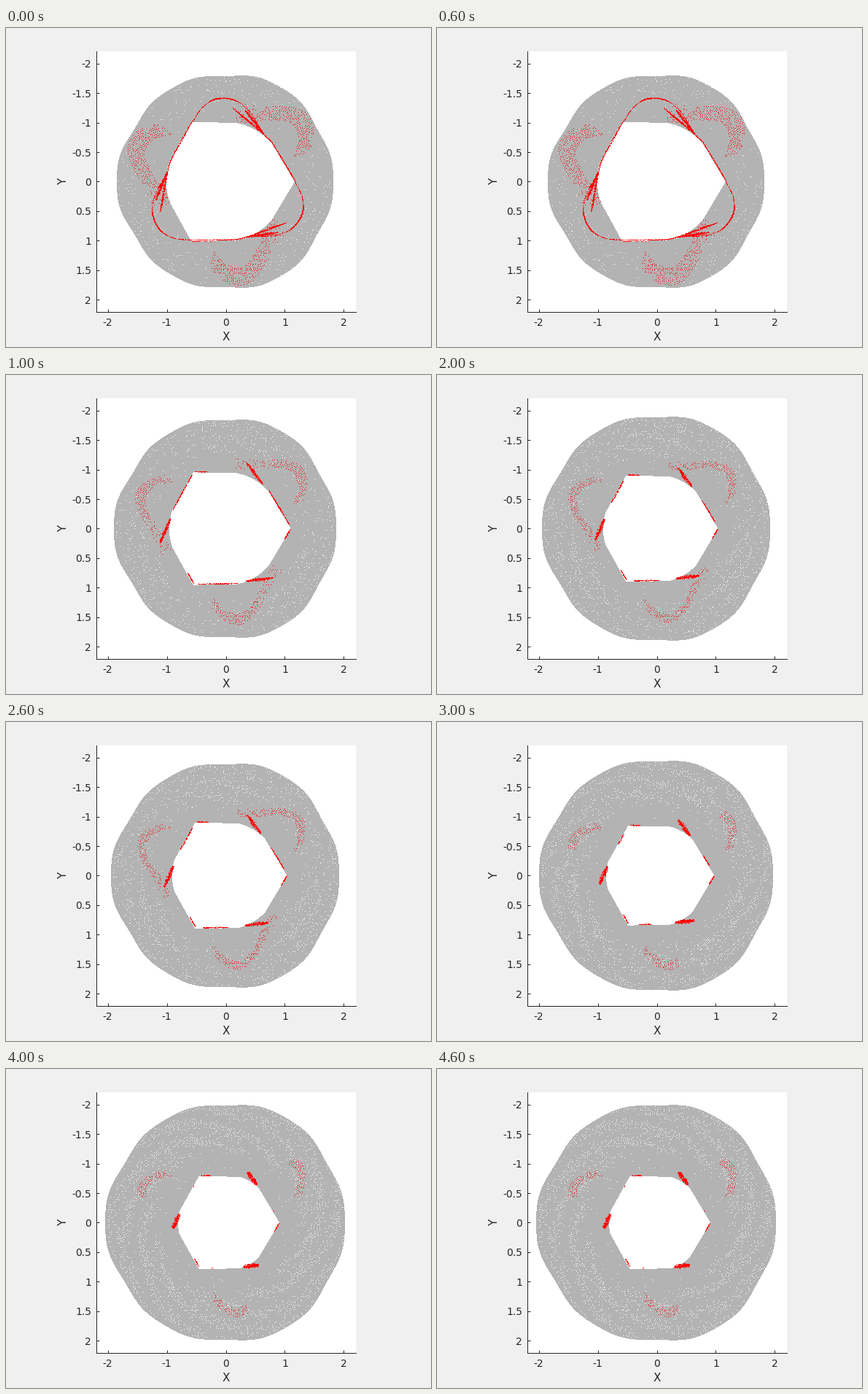
Write a matplotlib script that moves like this. It is 583 px wide and 437 px high and loops after 5000 ms.

```python
import numpy as np
import matplotlib.pyplot as plt
from matplotlib.animation import ArtistAnimation

W, H, DPI = 583, 437, 100
SIDE = 356                      # axes side in pixels
LEFT, BOTTOM = 123.5, 388.5     # axes corner in pixels from the top left
SCALE = SIDE / 4.4              # pixels per data unit
PX = 72 / DPI                   # points per pixel
INK, GRAY, RED = "#262626", "#b3b3b3", "#ff0000"
STEPS = 5
rng = np.random.default_rng(7)


# Shapes are in pixels from the centre, angles in degrees, clockwise on screen.

def outer(a, k):
    """Rounded hexagon, growing by a fixed offset per step."""
    t = np.radians(a)
    return 147 - np.cos(3 * t) + 2 * np.cos(6 * t) - np.cos(12 * t) + 4 * k


def inner(a, k):
    """Straight edges with three sharp and three capped corners."""
    f = np.abs(a % 120 - 60)
    edge = (80.3 - 4.45 * k) / np.cos(np.radians(f - 29))
    return np.minimum(edge, np.where(f < 29, 81 - 4 * k, edge))


def polar(r, a):
    t = np.radians(a)
    return np.column_stack([r * np.cos(t), r * np.sin(t)])


def area(ax, radius, k, color):
    a = np.linspace(0, 360, 721)
    return ax.fill(*(polar(radius(a, k), a) / SCALE).T, color=color, lw=0,
                   antialiased=False)


def dots(ax, pts, color):
    """Single pixels, repeated in all three sectors."""
    art = []
    for t in np.radians([0, 120, 240]):
        c, s = np.cos(t), np.sin(t)
        p = np.round(pts @ np.array([[c, s], [-s, c]])) / SCALE
        art += ax.plot(*p.T, ",", color=color)
    return art


def pinholes(k):
    """Gaps on a sheared polar lattice, denser as the ring swells."""
    t, a = np.meshgrid(np.arange(0.12, 0.98, 0.022), np.arange(0, 120, 1.2))
    t, a = t.ravel(), a.ravel()
    a = a + 17 * np.sin(np.pi * t)
    wave = np.radians(a)
    chance = (0.06 + 0.08 * k) * np.clip((t - 0.25) / 0.25, 0.06, 1)
    chance *= 1 + (0.65 - 0.15 * k) * np.sin(3 * wave)
    chance *= 0.7 + 0.5 * np.sin(24 * t + 9 * wave)
    keep = rng.random(t.size) < chance
    t, a = t[keep], a[keep]
    return polar((1 - t) * inner(a, k) + t * outer(a, k), a)


def cloud(k):
    """Dotted rows along an arc that bulges outward at -38 degrees."""
    swell = np.exp(-1.5 * k)
    half = 6 + 6 * swell
    end = -82 if k < 3 else -43
    d, a = np.meshgrid(np.arange(-half, half, 2.6), np.arange(end, -19, 1.2))
    d, a = d.ravel(), a.ravel()
    bump = np.exp(-((a + 38) / 20) ** 2)
    r = 88 + 37 * bump + 7 * swell + d
    keep = rng.random(a.size) < 0.2 + 0.6 * bump
    return (polar(r, a) + rng.uniform(-0.5, 0.5, (a.size, 2)))[keep]


def stroke(path, width):
    """Scattered pixels along a path, widest in the middle."""
    s = np.r_[0, np.cumsum(np.hypot(*np.diff(path, axis=0).T))]
    u = rng.random(int(s[-1] * width * 2.2) + 2)
    pts = np.column_stack([np.interp(u * s[-1], s, path[:, i])
                           for i in (0, 1)])
    spread = width * (0.4 + 0.6 * np.sin(np.pi * u))[:, None]
    return pts + rng.uniform(-0.5, 0.5, pts.shape) * spread


def rim(start, stop, k):
    """Part of the inner outline."""
    a = np.linspace(start, stop, 40)
    return polar(inner(a, k) + 0.5, a)


def streak(start, k):
    """Straight line from the ring to the inner outline."""
    a = np.array([start, -51])
    return polar(np.array([100 - 6.5 * k, inner(-51, k) + 1]), a)


def loop(start, stop):
    """Arch over a sharp corner, between two fractions of its length."""
    u = np.linspace(start, stop, 60)
    a = -120 + 70 * u
    return polar(inner(a, 0) + 33 * np.sin(np.pi * u ** 0.75) ** 1.5, a)


def strokes(k):
    middle, half = -25 + 3 * k, 25 - 6.2 * k
    yield stroke(rim(middle - half, middle + half, k), 1.2)
    yield stroke(streak(-75 + 2 * k, k), 3 + 0.6 * k)
    if k:
        yield stroke(rim(1, 11, k), 1.3)
    else:
        yield stroke(streak(-85, k), 2)
        yield stroke(loop(0, 1), 0.7)
        yield stroke(loop(0.25, 0.55), 1.6)


def scene(ax, k):
    art = area(ax, outer, k, GRAY)
    art += dots(ax, pinholes(k), "white")
    art += area(ax, inner, k, "white")
    art += dots(ax, cloud(k), RED)
    for pts in strokes(k):
        art += dots(ax, pts, RED)
    for z, item in enumerate(art):
        item.set_zorder(1 + z / 100)
    return art


plt.rcParams["font.family"] = "DejaVu Sans"
fig = plt.figure(figsize=(W / DPI, H / DPI), dpi=DPI, facecolor="#f0f0f0")
ax = fig.add_axes([LEFT / W, 1 - BOTTOM / H, SIDE / W, SIDE / H])

xticks = np.arange(-2, 3)
yticks = np.arange(-2, 2.1, 0.5)
ax.set_xticks(xticks, [f"{v:g}" for v in xticks])
ax.set_yticks(yticks, [f"{v:g}" for v in yticks])
ax.tick_params(direction="in", length=3.6 * PX, width=PX, color=INK,
               labelcolor=INK, labelsize=10)
ax.tick_params(axis="x", pad=9 * PX)
ax.tick_params(axis="y", pad=6.5 * PX)
ax.spines[["top", "right"]].set_visible(False)
ax.spines[["left", "bottom"]].set(color=INK, linewidth=PX)

label = dict(fontsize=11, color=INK, ha="center", va="baseline")
fig.text((LEFT + SIDE / 2) / W, 1 - 428 / H, "X", **label)
fig.text(83 / W, 1 - (BOTTOM - SIDE / 2) / H, "Y", rotation=90,
         rotation_mode="anchor", **label)

scenes = [scene(ax, k) for k in range(STEPS)]
ax.set_xlim(-2.2, 2.2)
ax.set_ylim(2.2, -2.2)

anim = ArtistAnimation(fig, scenes, interval=1000, repeat=True,
                       repeat_delay=0, blit=False)
plt.show()
```
